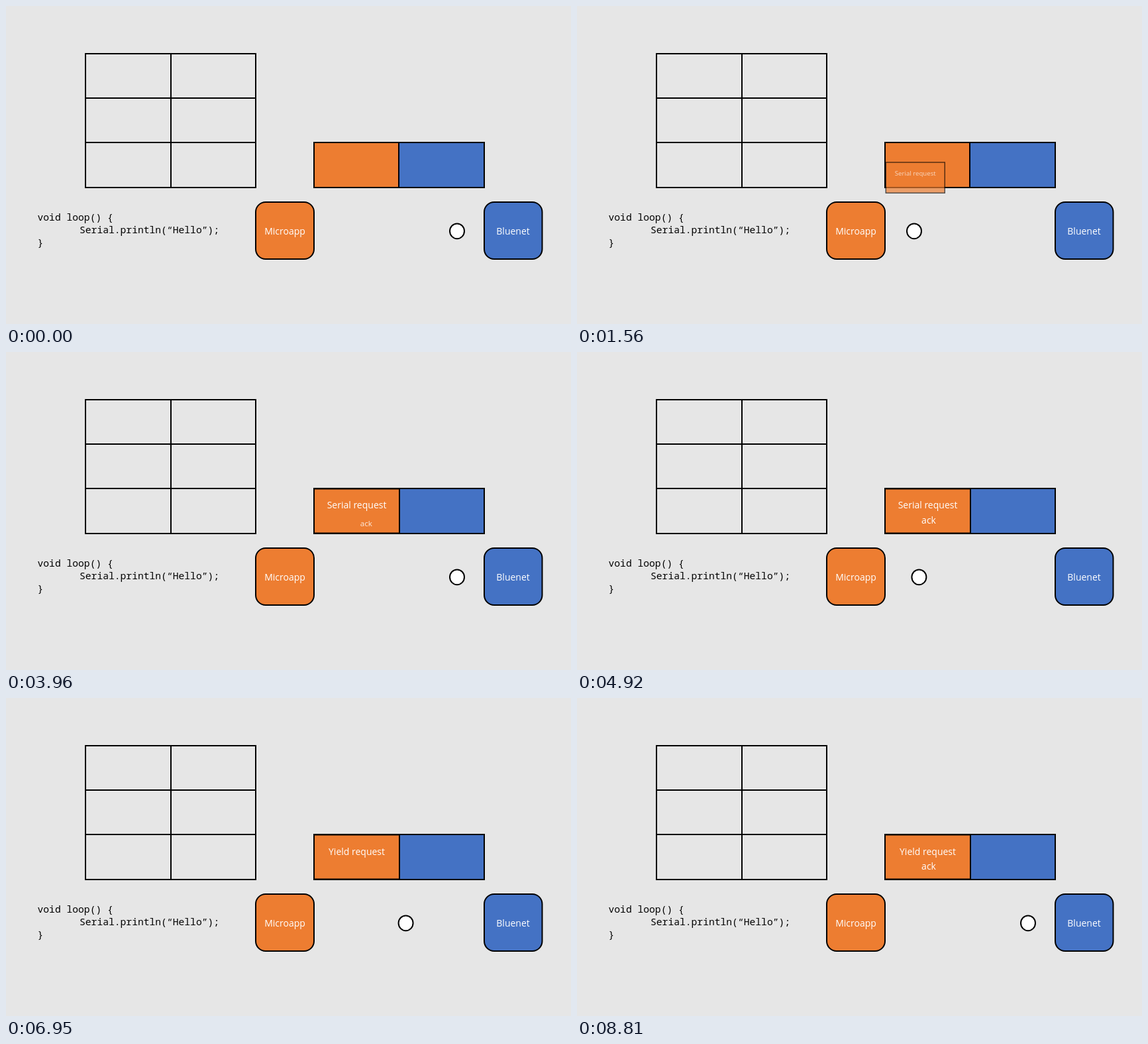
Recreate the animation shown at these times as an HTML page. Size 853 by 480 pixels, loop 8.87 s.

```html
<!DOCTYPE html>
<html lang="en">
<head>
<meta charset="utf-8">
<title>Serial request</title>
<style>
  html, body { margin: 0; width: 100%; height: 100%; overflow: hidden; background: #e6e6e6; }
  svg { display: block; width: 853px; height: 480px; }
  .line { fill: none; stroke: #000; stroke-width: 2; }
  .orange { fill: #ed7d31; }
  .blue { fill: #4472c4; }
  .ball { fill: #fff; }
  .label { font: 14px "Open Sans", "Noto Sans", sans-serif; fill: #fff; text-anchor: middle; }
  .code { font: 14.67px "Noto Sans Mono", "DejaVu Sans Mono", monospace; fill: #000; white-space: pre; }
</style>
</head>
<body>
<svg viewBox="0 0 853 480">
  <path class="line" d="M120 72H377V274H120ZM249 72V274M120 139H377M120 206H377"/>

  <rect class="line orange" x="465" y="206" width="128" height="68"/>
  <rect class="line blue" x="593" y="206" width="129" height="68"/>

  <g class="code">
    <text x="47.5" y="324">void loop() {</text>
    <text x="111" y="343">Serial.println(“Hello”);</text>
    <text x="47.5" y="362">}</text>
  </g>

  <rect class="line orange" x="377" y="296" width="88" height="86" rx="15"/>
  <text class="label" x="421" y="345">Microapp</text>
  <rect class="line blue" x="722" y="296" width="87.5" height="86" rx="15"/>
  <text class="label" x="765.5" y="345">Bluenet</text>

  <ellipse id="ball" class="line ball" cy="339.8" rx="11" ry="11.4"/>

  <g id="serial">
    <rect class="line orange" x="-64.5" y="-33.5" width="129" height="67"/>
    <text class="label" y="-4">Serial request</text>
  </g>
  <text id="ack1" class="label" y="5">ack</text>
  <g id="yield">
    <rect class="line orange" x="-64.5" y="-33.5" width="129" height="67"/>
    <text class="label" y="-3">Yield request</text>
  </g>
  <text id="ack2" class="label" y="5">ack</text>
</svg>
<script>
  const LOOP = 8870;
  const LEFT = 509, RIGHT = 681;
  const get = id => document.getElementById(id);
  const ball = get("ball");

  // Ball trips: start, from x, to x
  const trips = [
    [0, RIGHT, LEFT],
    [1848, LEFT, RIGHT],
    [4153, RIGHT, LEFT],
    [6478, LEFT, RIGHT]
  ];
  const TRIP = 900;

  const microapp = [432, 339.5], bluenet = [760, 338];
  const slot = [529.5, 240], reply = [531, 254];

  // Messages that fly out of a box while zooming and fading in
  const messages = [
    { el: get("serial"), start: 940, span: 900, from: microapp, to: slot },
    { el: get("ack1"), start: 3295, span: 800, from: bluenet, to: reply },
    { el: get("yield"), start: 5572, span: 900, from: microapp, to: slot },
    { el: get("ack2"), start: 7965, span: 800, from: bluenet, to: reply }
  ];

  const clamp = t => Math.min(1, Math.max(0, t));
  const ease = t => t < 0.5 ? 2 * t * t : 1 - 2 * (1 - t) ** 2;
  const mix = (a, b, k) => a + (b - a) * k;

  function drawBall(time) {
    const [start, from, to] = trips.findLast(trip => trip[0] <= time);
    ball.setAttribute("cx", mix(from, to, ease(clamp((time - start) / TRIP))));
  }

  function drawMessage({ el, start, span, from, to }, time) {
    const t = clamp((time - start) / span);
    const k = ease(t);
    const x = mix(from[0], to[0], k), y = mix(from[1], to[1], k);
    el.setAttribute("visibility", t > 0 ? "visible" : "hidden");
    el.setAttribute("opacity", t);
    el.setAttribute("transform", `translate(${x} ${y}) scale(${t})`);
  }

  function draw() {
    const time = performance.now() % LOOP;
    drawBall(time);
    messages.forEach(message => drawMessage(message, time));
    requestAnimationFrame(draw);
  }
  draw();
</script>
</body>
</html>
```
